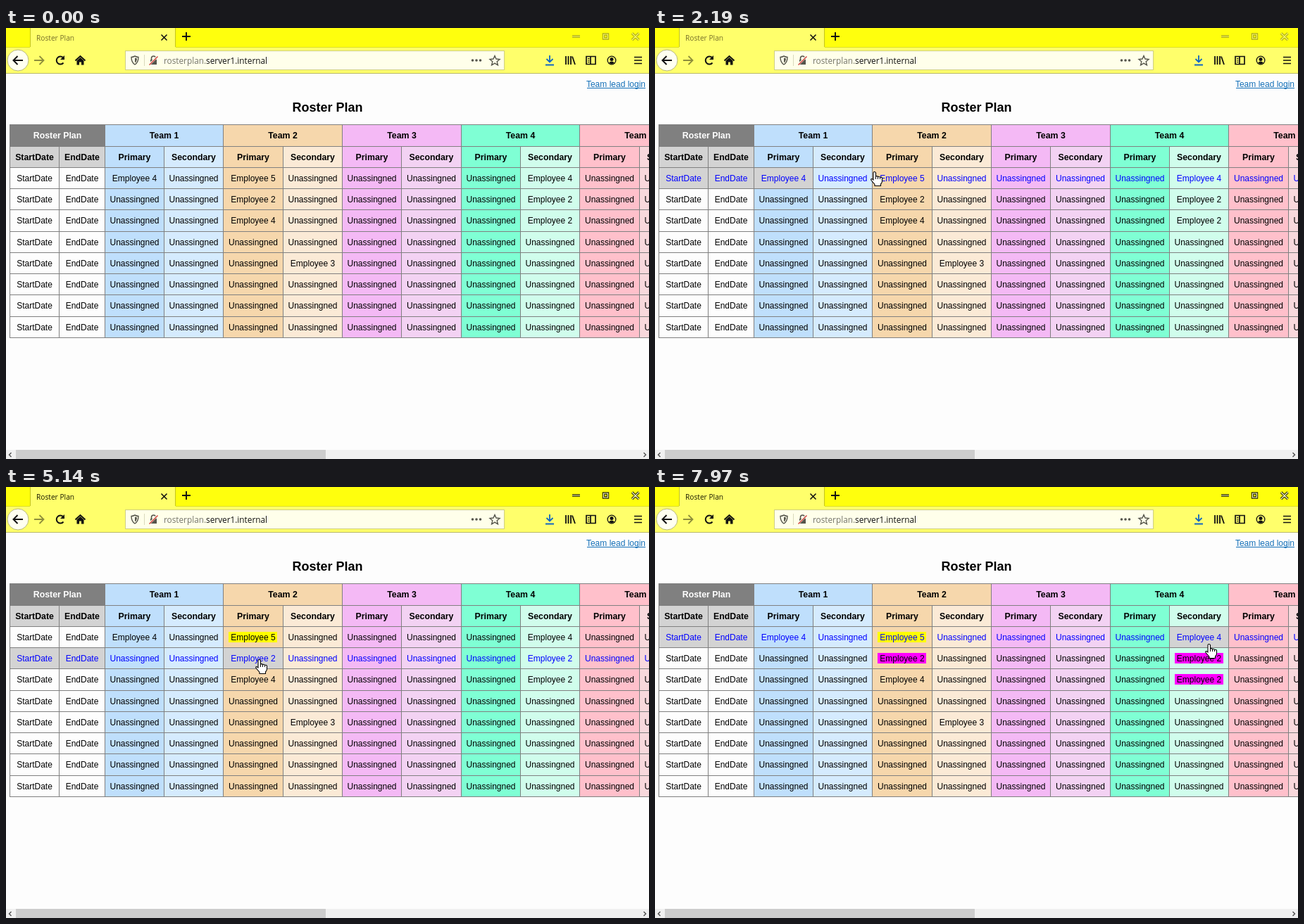
Write an HTML page with a canvas that moves like this. It is 913 px wide and 613 px high and loops after 8 s.

```html
<!DOCTYPE html>
<html lang="en">
<head>
<meta charset="utf-8">
<title>Roster Plan</title>
<style>
html, body { margin: 0; height: 100%; overflow: hidden; background: #fdfdfd; }
canvas { display: block; }
</style>
</head>
<body>
<canvas id="stage" width="913" height="613"></canvas>
<script>
const ctx = document.getElementById('stage').getContext('2d');
const LOOP = 8000, HOVER_LAG = 50;
const SANS = '"Liberation Sans", Arial, sans-serif', UI = '"Open Sans", "Noto Sans", sans-serif';
const REGULAR = '12px ' + SANS, BOLD = 'bold 12.3px ' + SANS;

const CLICKS = [
  { from: 4250, to: 4400, tag: 4320, name: 'Employee 5', color: '#ff0' },
  { from: 5540, to: 5630, tag: 5600, name: 'Employee 2', color: '#f0f' }
];
const TEAMS = [['#bfdffc', '#d5ebfe'], ['#f6d7ac', '#fbead6'], ['#f4b9f5', '#f3d2f3'],
  ['#7fffd4', '#d0fdec'], ['#ffc0cb', '#f8d8dc']];
const PEOPLE = { '0,2': 4, '0,4': 5, '1,4': 2, '2,4': 4, '4,5': 3, '0,9': 4, '1,9': 2, '2,9': 2 };
const GREY = '#d3d3d3';

const colX = c => c < 2 ? [5, 75][c] : Math.round(139.7 + (c - 2) * 84.333);
const rowY = r => Math.round(137.4 + r * 30.25);

// The pointer's way: straight legs and loops around a name
const linear = u => u, out = u => u * (2 - u);
const legs = [];
let spot = [400, 606];

function go(from, to, x, y, ease = out) {
  const [x0, y0] = spot;
  legs.push({ from, to, at: u => [x0 + (x - x0) * ease(u), y0 + (y - y0) * ease(u)] });
  spot = [x, y];
}
function circle(from, to, turns) {
  const [x0, y0] = spot;
  const at = u => {
    const a = -u * turns * 2 * Math.PI;
    return [x0 - 30 + 30 * Math.cos(a), y0 + 34 * Math.sin(a)];
  };
  legs.push({ from, to, at });
  spot = at(1);
}

go(370, 1050, 233, 360, linear);
go(1050, 1360, 215, 204);
circle(1660, 2140, 1);
go(2140, 2190, 311, 204, linear);
go(2190, 2440, 380, 204);
circle(2470, 3180, 1.75);
go(3280, 3400, 329, 227);
go(3600, 3690, 345, 222);
go(4930, 5240, 362, 248);
go(6260, 6290, 362, 252);
go(6290, 6660, 378, 283);
go(7090, 7300, 721, 285);
go(7300, 7420, 770, 297);
go(7420, 7860, 787, 227, linear);
go(7860, 7970, 787, 223);

function pointerAt(t) {
  const leg = legs.filter(l => l.from <= t).pop();
  return leg && leg.at(Math.min(1, (t - leg.from) / (leg.to - leg.from))).map(Math.round);
}

function box(x, y, w, h, fill) {
  ctx.fillStyle = fill;
  ctx.fillRect(x, y, w, h);
}
function text(s, x, y, font, color = '#000', align = 'center') {
  ctx.font = font;
  ctx.fillStyle = color;
  ctx.textAlign = align;
  ctx.fillText(s, x, y);
}
function path(d, stroke, width = 1, fill) {
  const p = new Path2D(d);
  ctx.lineWidth = width;
  if (fill) { ctx.fillStyle = fill; ctx.fill(p); }
  if (stroke) { ctx.strokeStyle = stroke; ctx.stroke(p); }
}
function disc(x, y, r, fill, stroke) {
  ctx.beginPath();
  ctx.arc(x, y, r, 0, 7);
  ctx.fillStyle = fill;
  ctx.fill();
  if (stroke) { ctx.lineWidth = 1; ctx.strokeStyle = stroke; ctx.stroke(); }
}

function drawTabs(active) {
  box(0, 0, 913, 27, '#ffff0d');
  box(0, 27, 913, 37, '#ffff6b');
  box(35, 0, 205, 28, '#ffff6b');
  for (const x of [34, 240]) box(x, 0, 1, 27, '#c4c420');
  box(0, 27, 34, 1, '#dede2a');
  box(241, 27, 672, 1, '#dede2a');
  box(0, 64, 913, 1, '#b9b96a');
  text('Roster Plan', 43, 17.5, '10.2px ' + UI, active ? '#1a1a00' : '#77702a', 'left');
  path('M220.5 9.5l8 8m0-8l-8 8', '#111', 1.6);
  path('M250 12h12m-6-6v12', '#111', 1.9);
  const controls = 'M804 12h11M848.500 9h6v6h-6zM889 7.500l9.500 9.500m0-9.500l-9.500 9.500';
  path(controls, active ? '#222200' : '#a5a51c', 3.4);
  path(controls, active ? '#ffffc0' : '#ffff60', 1.2);
}

function drawToolbar() {
  disc(17, 46, 15, '#fffff0', '#b8b878');
  path('M24 46H11m5.5-6l-6 6 6 6', '#111', 2);
  path('M40 46h13m-5.5-6l6 6-6 6', '#8e8e3c', 1.8);
  path('M81.5 49.5a5.5 5.5 0 1 1-.5-7.5', '#111', 2);
  path('M83 39v6h-6z', null, 1, '#111');
  path('M98.5 46.5l7-6.5 7 6.5', '#111', 2);
  path('M100.5 46.5l5-4.5 5 4.5v6h-3.5v-4h-3v4h-3.5z', null, 1, '#111');

  box(169, 32, 539, 28, '#cfcf82');
  box(170, 33, 537, 26, '#ffffea');
  path('M183 40c2 1 3.5 1.5 5 1.5 0 5-1 8-5 10.5-4-2.5-5-5.500-5-10.5 1.5 0 3-.5 5-1.5z', '#55554c', 1.4);
  path('M183 42.5v7c2-1.5 2.7-3 3-6.3z', null, 1, '#55554c');
  box(196, 38, 1, 16, '#d9d9bb');
  path('M206.5 46v-3a3 3 0 0 1 6 0v3', '#55554c', 1.6);
  box(205, 45, 9, 7, '#55554c');
  path('M203.5 52l12-12', '#ffffea', 3);
  path('M203.5 52.5l12-12', '#d04040', 1.4);
  text('rosterplan.', 224, 50.5, '11.8px ' + UI, '#77776c', 'left');
  const w = ctx.measureText('rosterplan.').width;
  text('server1.internal', 224 + w, 50.5, '11.8px ' + UI, '#111', 'left');
  for (const x of [662.5, 668, 673.5]) disc(x, 46, 1.8, '#55554c');
  path('M694 39.5l2 4.5 5 .5-3.8 3.3 1.2 5-4.4-2.7-4.4 2.7 1.2-5-3.8-3.3 5-.5z', '#55554c', 1.4);

  path('M772 39v9m-4.5-4l4.5 4.5 4.5-4.5M766 52.5h12', '#1067c4', 1.8);
  path('M795 40v12m3.5-12v12m3.5-12v12m2-11.5l4 11.5', '#111', 1.8);
  path('M824 40.5h13v11h-13zM830 40v12', '#111', 1.7);
  path('M826 43.5h2.5m-2.5 2.5h2.5m-2.5 2.5h2.5', '#111', 1);
  disc(860, 46, 6.5, '#111');
  disc(860, 46, 5.2, '#ffff6b');
  disc(860, 44.5, 2.5, '#111');
  path('M856 49.5q4-4 8 0-4 3.5-8 0z', null, 1, '#111');
  path('M892 41.5h11m-11 4.5h11m-11 4.5h11', '#111', 1.7);
}

function drawPage() {
  box(0, 65, 913, 548, '#fdfdfd');
  text('Team lead login', 908, 84, REGULAR, '#1470b8', 'right');
  box(825, 85, 83, 1, '#1470b8');
  text('Roster Plan', 456.5, 119, 'bold 18px ' + SANS);
  box(0, 600, 913, 13, '#f0f0f0');
  box(14, 600, 440, 13, '#cdcdcd');
  path('M7.5 604l-3 3 3 3M905.5 604l3 3-3 3', '#505050', 1.4);
}

function cell(c, r, span, fill, label, font, color, tag) {
  const x = colX(c), y = rowY(r), end = colX(c + span), mid = (x + end + 1) / 2;
  box(x + 1, y + 1, end - x - 1, rowY(r + 1) - y - 1, fill);
  if (tag) box(Math.round(mid - 35), y + 8, 69, 15, tag);
  text(label, mid, y + 20, font, color);
}

function drawTable(t) {
  const tip = pointerAt(t - HOVER_LAG);
  const tags = {};
  for (const k of CLICKS) if (t >= k.tag) tags[k.name] = k.color;

  box(5, 137, 908, 304, '#808080');
  cell(0, 0, 2, '#808080', 'Roster Plan', BOLD, '#fff');
  cell(0, 1, 1, GREY, 'StartDate', BOLD);
  cell(1, 1, 1, GREY, 'EndDate', BOLD);
  TEAMS.forEach(([main, pale], i) => {
    cell(2 + i * 2, 0, 2, main, 'Team ' + (i + 1), BOLD);
    cell(2 + i * 2, 1, 1, main, 'Primary', BOLD);
    cell(3 + i * 2, 1, 1, pale, 'Secondary', BOLD);
  });
  for (let r = 0; r < 8; r++) {
    const over = tip && tip[1] > rowY(r + 2) && tip[1] <= rowY(r + 3);
    for (let c = 0; c < 12; c++) {
      const id = PEOPLE[r + ',' + c];
      const label = c === 0 ? 'StartDate' : c === 1 ? 'EndDate' : id ? 'Employee ' + id : 'Unassingned';
      const here = over && (c < 2 || tip[0] > colX(c) && tip[0] <= colX(c + 1));
      const base = c < 2 ? '#fdfdfd' : TEAMS[(c >> 1) - 1][c % 2];
      cell(c, r + 2, 1, here ? GREY : base, label, REGULAR, over ? '#00f' : '#000', tags[label]);
    }
  }
}

function drawPointer(t) {
  const tip = pointerAt(t);
  if (!tip) return;
  ctx.save();
  ctx.translate(...tip);
  if (CLICKS.some(k => t >= k.from && t < k.to)) disc(0, 1.5, 11, 'rgba(246,228,20,.75)');
  path('M-2 2Q-2 .5-.5 .5T1.5 2V7Q3 6 4.5 7.5 6 6.8 7.5 8.3 10.5 8 10.5 10V14Q10.5 16 8.5 18V20.5H0V18.5L-5 12.5Q-6 10.5-4 10.5L-2 12Z', '#000', 1.1, '#fff');
  path('M1.5 7v4m3-3.5v3.5m3-2.5v2.5', '#000', 1);
  ctx.restore();
}

function frame(now) {
  const t = now % LOOP;
  drawTabs(t >= CLICKS[0].tag);
  drawToolbar();
  drawPage();
  drawTable(t);
  drawPointer(t);
  requestAnimationFrame(frame);
}
frame(0);
</script>
</body>
</html>
```
